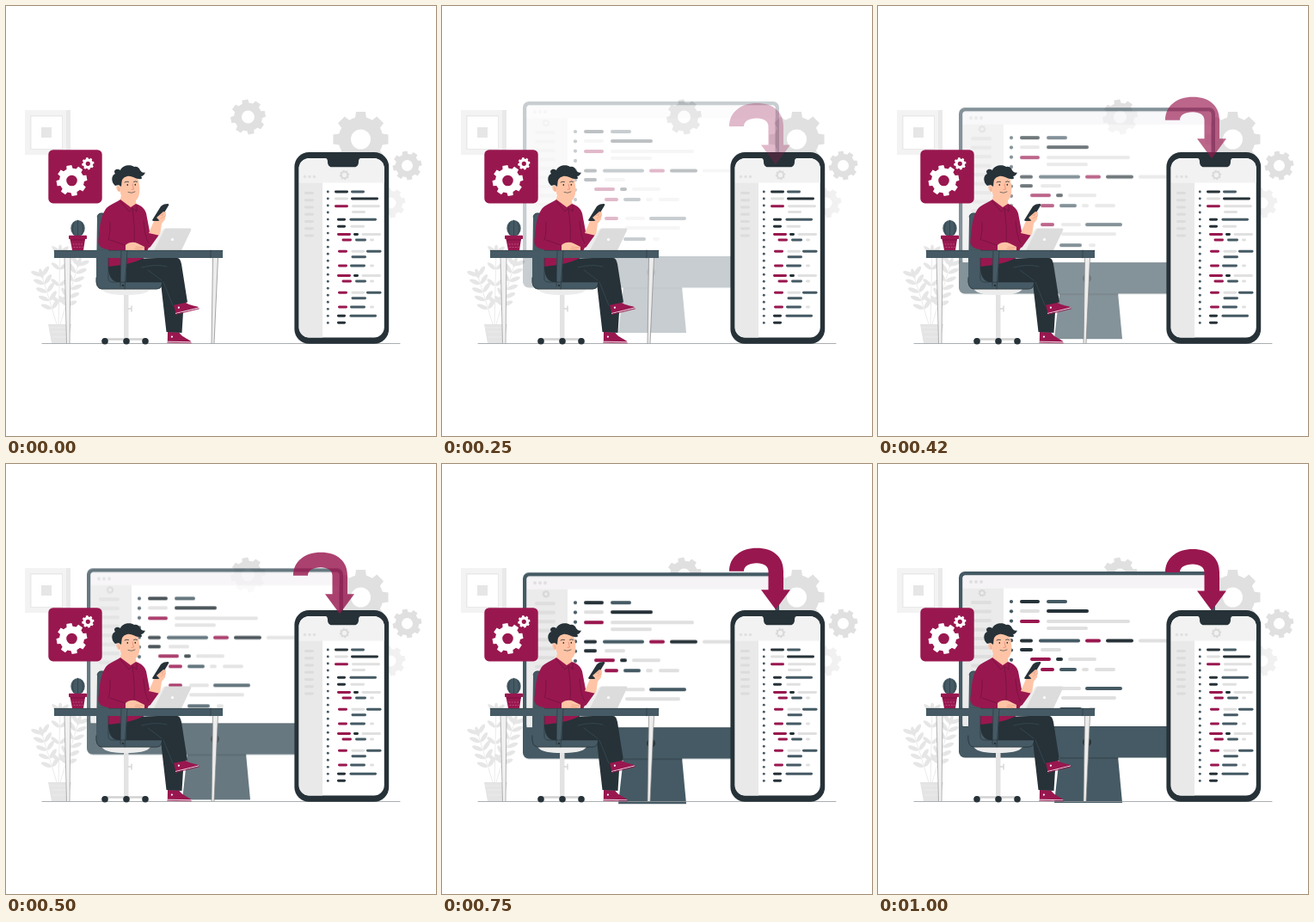
These frames come from a looping animation (500 by 500 pixels, 1.04 s). An HTML page with a canvas:

```html
<!DOCTYPE html>
<html lang="en">
<head>
<meta charset="utf-8">
<title>App development</title>
<style>
html, body { margin: 0; width: 100%; height: 100%; overflow: hidden; background: #fff; }
canvas { display: block; width: 500px; height: 500px; }
</style>
</head>
<body>
<canvas id="stage"></canvas>
<script>
const SIZE = 500, LOOP = 1040, STEP = 1000 / 24, TRAVEL = 20;
const DARK = '#263238', SLATE = '#455a64', WINE = '#99174f', GREY = '#e0e0e0', SKIN = '#ffc4a6';
const INK = { d: DARK, s: SLATE, w: WINE, g: GREY };
const dpr = window.devicePixelRatio || 1;

function setup(canvas) {
  canvas.width = canvas.height = SIZE * dpr;
  const c = canvas.getContext('2d');
  c.scale(dpr, dpr);
  return c;
}

const stage = setup(document.getElementById('stage'));
let g = stage;

function layer(draw) {
  const canvas = document.createElement('canvas');
  g = setup(canvas);
  draw();
  g = stage;
  return canvas;
}

function fill(d, color) {
  g.fillStyle = color;
  g.fill(new Path2D(d));
}

function stroke(d, color, width = 0.7) {
  g.strokeStyle = color;
  g.lineWidth = width;
  g.lineCap = g.lineJoin = 'round';
  g.stroke(new Path2D(d));
}

function rect(x, y, x2, y2, color, r = 0) {
  g.fillStyle = color;
  g.beginPath();
  g.roundRect(x, y, x2 - x, y2 - y, r);
  g.fill();
}

function oval(x, y, rx, color, ry = rx, turn = 0) {
  g.fillStyle = color;
  g.beginPath();
  g.ellipse(x, y, rx, ry, turn, 0, Math.PI * 2);
  g.fill();
}

function gear(x, y, r, hole, color, turn = -0.18) {
  const inner = r * 0.8, step = Math.PI / 4;
  g.beginPath();
  for (let i = 0; i < 8; i++) {
    const a = turn + i * step;
    for (const [off, rad] of [[-0.25, inner], [-0.17, r], [0.17, r], [0.25, inner]]) {
      g.lineTo(x + rad * Math.cos(a + off), y + rad * Math.sin(a + off));
    }
    g.arc(x, y, inner, a + 0.25, a + step - 0.25);
  }
  g.closePath();
  g.moveTo(x + hole, y);
  g.arc(x, y, hole, 0, Math.PI * 2);
  g.fillStyle = color;
  g.fill('evenodd');
}

// Rows read "y ink-x1-x2 ...".
function codeRows(rows, h, dy = 0) {
  for (const row of rows) {
    const [y, ...bars] = row.split(' ');
    for (const bar of bars) {
      const [ink, a, b] = bar.split('-');
      const cy = +y + dy;
      rect(+a, cy - h / 2, +b, cy + h / 2, INK[ink], h / 2);
    }
  }
}

const screenRows = [
  '160 d-165-188 s-196-220', '171 g-165-188 d-196-245',
  '183 w-165-188 g-196-293', '191 g-196-244',
  '205.5 d-165-180 s-187-235 w-241-259 d-265-297 g-303-345',
  '216 d-165-180 g-189-213', '227 w-177-201 d-207-215 g-221-254',
  '239 w-189-205 s-211-231 g-237-245 g-252-276',
  '261 w-189-205 g-213-236 s-241-284', '272 g-213-277', '285 s-211-237 g-245-253'
];
const phoneTop = [
  '216 d-382-398 s-401-417', '224 g-382-398 d-401-433',
  '232.7 w-382-398 g-402-435', '239.5 g-402-418',
  '248.2 d-385-395 s-399.5-431', '256.3 d-385-395 g-400.5-417'
];
const phoneBlock = [
  '265.5 w-385-401 d-404-410 g-413.5-436', '272 w-390.5-402 s-406-419 g-423-428',
  '285.2 w-386-397 g-401.5-417 s-419-436.5', '291.7 s-401.5-419',
  '302 w-386-397 s-400-418 g-423-428'
];
const phoneEnd = ['360.2 d-385-395 s-399.5-431', '368.3 d-385-395'];

function sprig(x0, y0, x1, y1, pairs, size) {
  const a = Math.atan2(y1 - y0, x1 - x0);
  stroke(`M${x0} ${y0}L${x1} ${y1}`, '#e6e6e6', 0.8);
  for (let i = 0; i < pairs; i++) {
    const k = 0.3 + 0.65 * i / (pairs - 1);
    const x = x0 + (x1 - x0) * k, y = y0 + (y1 - y0) * k;
    for (const side of [-0.9, 0.9]) {
      const t = a + side;
      oval(x + Math.cos(t) * size, y + Math.sin(t) * size, size * 0.9, '#e6e6e6', size * 0.34, t);
    }
  }
  oval(x1, y1, size * 0.8, '#e6e6e6', size * 0.32, a);
}

function drawBack() {
  rect(22, 121, 75, 173, '#f3f3f3');
  fill('M70 121H75V173L70 168Z', '#e9e9e9');
  rect(28, 127, 66, 167, '#e9e9e9');
  rect(29.5, 128.5, 65, 166, '#fff');
  rect(41, 141, 53, 153, '#e6e6e6');

  sprig(61, 371, 63, 283, 4, 6.5);
  sprig(59, 370, 41, 311, 5, 7.2);
  sprig(63, 370, 85, 298, 6, 7.2);
  fill('M49 370H76L72 392H53Z', '#e4e4e4');
  stroke('M50 374H75M53 379H73M54 385H72', '#ededed', 0.8);

  gear(281.5, 129, 20.5, 7.5, GREY);
  gear(412.5, 155, 32.5, 11.5, GREY, 0);
  gear(466.5, 185.5, 17, 6.5, GREY);
  gear(447, 229, 17.5, 6.5, '#f1f1f1');
}

function drawMonitor() {
  fill('M211 340H279L284 394H205Z', SLATE);
  rect(94, 125, 392, 341.5, SLATE, 7);
  stroke('M99 305H387M211 342H279', DARK, 0.6);
  oval(243, 323.5, 5, DARK);
  rect(98.5, 129.5, 387.5, 305, '#fff', 3);
  rect(98.5, 129.5, 387.5, 144.5, '#f5f3f6', [3, 3, 0, 0]);
  rect(98.5, 144.5, 146, 305, '#ebebeb');
  for (const x of [108, 114, 120]) oval(x, 137, 2, GREY);
  gear(121, 150, 4.5, 2, '#d6d6d6');
  for (let i = 0; i < 11; i++) {
    rect(108, 159 + i * 10.5, 132, 163 + i * 10.5, '#dedede', 2);
    oval(155, 160 + i * 11.3, 2.1, SLATE);
  }
  codeRows(screenRows, 4);
}

function drawChair() {
  rect(137, 334, 142.5, 389, '#e3e3e3');
  fill('M111 329H168C164 335 153 336 139 336S116 335 111 329Z', '#ececec');
  stroke('M142 352H146M146 349V355', '#d6d6d6', 1.4);
  stroke('M115 387.5H162', '#d2d2d2', 2.5);
  for (const x of [115, 140, 162]) oval(x, 389.8, 3.8, DARK);
  fill('M106 245Q107 240 113 241H121V293H160V320H181V325Q180 329 175 329H111Q104 328 105 316Z', SLATE);
  stroke('M106 245Q107 240 113 241H121M105 316Q104 328 111 329H175Q180 329 181 325V320', DARK, 0.6);
}

function drawShoe(x, y, turn) {
  g.save();
  g.translate(x, y);
  g.rotate(turn);
  fill('M0 -1L13 -1C16 4 22 6 27 9V10.5H0Z', WINE);
  stroke('M0 10.2H27', '#f7e6ee', 0.8);
  stroke('M0 11.3H27.5', WINE, 0.8);
  oval(5, 4.5, 1.1, '#fff');
  g.restore();
}

function drawLegs() {
  drawShoe(188, 380, 0.02);
  fill('M164 305L190 302L207 340L204.5 380L186.5 379L180 322Z', DARK);
  drawShoe(195, 347.5, -0.24);
  fill('M119 302C130 297 150 293 176 293H199C202 293 203 296 204 300L211 344.5L194 348L183 321H129C121 319 119 311 119 302Z', DARK);
  stroke('M158 304C170 301 178 301 187 303M183 321L194 348M165 307L181 319', SLATE, 0.5);
}

function drawPerson() {
  // Neck, torso and sleeves
  fill('M134 220H150L152 233L145 238L132 229Z', SKIN);
  fill('M133 225L145 234L151 230C157 232 161 235 163 241L167 262L179 266C178 275 173 280 166 281L160 293C150 299 136 301 119 303V283C108 282 106 277 108 268C109 256 110 245 116 236C120 231 127 229 133 225Z', WINE);
  stroke('M147 236C150 255 150 270 147 292M121 251C121 260 121 266 119 272M121 272L138 278M160 250C161 261 162 269 166 276M133 227L143 239L147 235L152 239L152 232', '#671139', 0.65);
  // Resting hand
  fill('M139 278C143 274 149 274 153 276L161 280V284H139Z', SKIN);
  stroke('M151 280L160 281M150 282L157 283', '#d7866f', 0.5);
  // Raised hand
  fill('M166 264L172 250C174 244 179 239 183 237L186 240L185 248L181 253L179 267Z', SKIN);
  fill('M170 249L180 233Q182 231 184 230.5L188 230Q190 230 189 232L179 248.5Q178 250 176 250H171Z', DARK);
  fill('M175 246L183 239L186 240L181 244L186 242L186 244L181 247L185 246L180 251Z', SKIN);
  stroke('M179 244L184 240M180 247L185 244', '#d7866f', 0.4);

  // Head
  fill('M133 198C139 193 150 194 153 199C155 206 156 212 155 218C154 225 149 229 143 228C137 228 135 222 133 218Z', SKIN);
  oval(131.5, 212, 3, SKIN, 4, -0.3);
  fill('M127 209C122 205 122 197 127 195C124 191 129 188 133 191C135 185 145 184 149 187C152 186 155 188 156 191C158 194 160 194 162 193.5C161 196 159 198 157 198C159 200 158 202 154 201C150 201 146 197 141 198C137 199 135 201 134.5 205L134 210L131 208Z', DARK);
  stroke('M138 205Q140 203.5 142.5 204.5M148.5 204.5Q150.5 203 152.5 204.5', DARK, 0.8);
  oval(141.3, 208, 0.8, DARK, 1.1);
  oval(150.3, 207.8, 0.8, DARK, 1.1);
  stroke('M147 207L148.5 213L146 213.5', '#d7765f', 0.6);
  stroke('M142 216.5Q146 218.5 150 216', DARK, 0.6);
  stroke('M130.5 211Q132 212 131.5 215', '#d7866f', 0.5);
}

function drawDesk() {
  fill('M68 293H75L74 392H70.5Z', '#f1f1f1');
  stroke('M68 293L70.5 392M75 293L74 392', '#959595', 0.7);
  fill('M240.5 293H246.5L242 392H239Z', '#ececec');
  stroke('M240.5 293L239 392M246.5 293L242 392', '#858585', 0.7);
}

function drawTop() {
  fill('M183 260Q184 258.5 186 258.5H214Q216 259 215 261L204 284H169Z', '#dcdcdc');
  fill('M182 260.5Q183 259 185 258.8L172 284H165Z', '#ededed');
  oval(193.5, 271.5, 1.6, '#fff');
  rect(56, 284, 252, 293, SLATE);
  stroke('M56 284.3H252M238 284V293', DARK, 0.5);

  fill('M105 284H119V317Q119 321 124 321H181V325Q180 329 175 329H111Q104 328 105 316Z', SLATE);
  fill('M133 285H141L139 329H133Z', SLATE);
  stroke('M119 293V317Q119 321 124 321H181M134 285L133 326M141 285L138 329M105 316Q104 328 111 329H175Q180 329 181 324', DARK, 0.6);
  oval(136, 325, 1.2, DARK);

  oval(83.5, 258.5, 8.2, SLATE, 9.6);
  stroke('M83.5 249V267M79 252Q76 259 79 266M88 252Q91 259 88 266', DARK, 0.5);
  rect(73, 266.7, 94, 271, WINE, 0.7);
  fill('M74.5 271H92L90 284H77Z', WINE);
  stroke('M75 272H91.5', '#671139', 0.7);
  g.setLineDash([1, 2.2]);
  stroke('M78 277H90M79 280.5H89', '#c9789c', 0.6);
  g.setLineDash([]);
}

function drawPhone() {
  rect(335.4, 170, 445.2, 392.7, DARK, 17);
  g.save();
  g.beginPath();
  g.roundRect(340.6, 177, 99.2, 208.6, 12);
  g.clip();
  rect(340, 177, 440, 386, '#fff');
  rect(340, 177, 440, 205.5, '#f2f2f2');
  rect(340, 205.5, 368, 386, '#e9e9e9');
  g.restore();
  fill('M370 176.5C373 177 374 178 374 181C374 185 376 187.3 379 187.3H405C408 187.3 410 185 410 181C410 178 411 177 414 176.5Z', DARK);
  for (const x of [347.5, 353, 358.5]) oval(x, 198.5, 1.7, GREY);
  gear(393.5, 196.5, 5.8, 2.7, '#dadada');
  for (let i = 0; i < 7; i++) {
    const y = 217.5 + i * 8.25;
    rect(347, y - 1.4, 358, y + 1.4, '#dcdcdc', 1.4);
  }
  for (let i = 0; i < 20; i++) oval(374.3, 216 + i * 8.02, 1.45, SLATE);
  codeRows(phoneTop, 2.9);
  codeRows(phoneBlock, 2.9);
  codeRows(phoneBlock, 2.9, 48);
  codeRows(phoneEnd, 2.9);
}

function drawFront() {
  stroke('M42 392.5H458', '#969b9e', 0.8);
  rect(49.3, 167.2, 111.7, 229.4, WINE, 5.5);
  gear(76.5, 203, 18, 6.3, '#fff');
  gear(95.3, 183.3, 7.2, 2.6, '#fff');
  drawChair();
  drawDesk();
  drawLegs();
  drawPerson();
  drawTop();
  drawPhone();
}

const arrow = 'M334 126C334 109 348 99 366 99C385 99 397 109 397 126V147.5H405L388 170.5L371 147.5H379.5V126C379.5 120 374 116.5 366 116.5C357 116.5 351 120 351 126Z';
const back = layer(drawBack), monitor = layer(drawMonitor), front = layer(drawFront);

function bezier(s, a, b) {
  const q = 1 - s;
  return 3 * a * q * q * s + 3 * b * q * s * s + s * s * s;
}

// cubic-bezier(.36, -.01, .5, 1.38)
function ease(u) {
  if (u >= 1) return 1;
  let lo = 0, hi = 1;
  for (let i = 0; i < 24; i++) {
    const mid = (lo + hi) / 2;
    if (bezier(mid, 0.36, 0.5) < u) lo = mid; else hi = mid;
  }
  return bezier(lo, -0.01, 1.38);
}

function paste(image, dy = 0) {
  g.drawImage(image, 0, dy, SIZE, SIZE);
}

function render(time) {
  const tick = Math.floor((time % LOOP + 4) / STEP);
  const p = tick < 2 ? 0 : ease(tick / 24 + 0.04);
  const shift = TRAVEL * (1 - p);
  const alpha = Math.max(0, Math.min(1, p));

  g.fillStyle = '#fff';
  g.fillRect(0, 0, SIZE, SIZE);
  paste(back);
  g.globalAlpha = alpha;
  paste(monitor, -shift);
  g.globalAlpha = 1;
  paste(front);
  g.save();
  g.globalAlpha = alpha;
  g.translate(0, shift);
  fill(arrow, WINE);
  g.restore();
}

const start = performance.now();
function loop() {
  render(performance.now() - start);
  requestAnimationFrame(loop);
}
loop();
</script>
</body>
</html>
```
